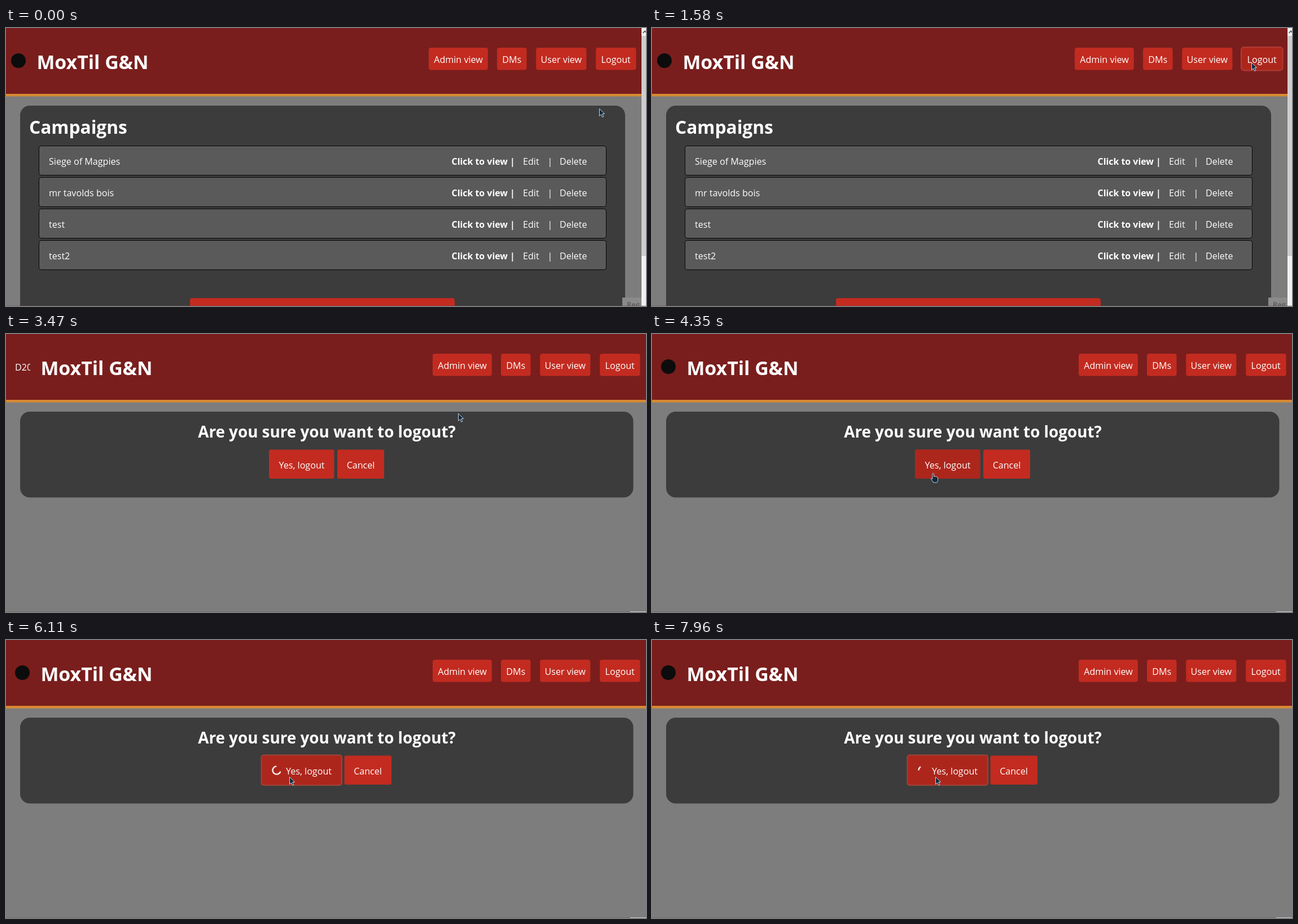
An HTML page for the animation above (8000 ms loop, 1134 by 494 pixels).

```html
<!DOCTYPE html>
<html lang="en">
<head>
<meta charset="utf-8">
<title>Logout flow</title>
<style>
html, body { margin: 0; width: 100%; height: 100%; overflow: hidden; background: #7d7d7d; }
svg { display: block; }
#stage { width: 1134px; height: 494px; font: 16.1px "Open Sans", "Noto Sans", sans-serif; fill: #fff; }
.mid { text-anchor: middle; }
.bold { font-weight: 700; }
.red { fill: #c32b20; }
.dark { fill: #ad261c; }
.card { fill: #3c3c3c; }
.row { fill: #5a5a5a; stroke: #050505; }

/* hard switches */
.list, .confirm, .alt, .logo2, .over, .ring, .idle, .hover2, .busy, .arrow, .hand {
  animation: 8s step-end infinite;
}
.list { animation-name: list; }
.confirm { animation-name: confirm; }
.alt { animation-name: alt; }
.logo2 { animation-name: logo2; }
.over { animation-name: over; }
.ring { animation-name: ring; }
.idle { animation-name: idle; }
.hover2 { animation-name: hover2; }
.busy { animation-name: busy; }
.arrow { animation-name: arrow; }
.hand { animation-name: hand; }
@keyframes list { 0% { opacity: 1 } 43.375%, 100% { opacity: 0 } }
@keyframes confirm { 0% { opacity: 0 } 43.375%, 100% { opacity: 1 } }
@keyframes alt { 0% { opacity: 1 } 45.875%, 100% { opacity: 0 } }
@keyframes logo2 { 0% { opacity: 0 } 45.875%, 100% { opacity: 1 } }
@keyframes over { 0% { opacity: 0 } 3.625%, 100% { opacity: 1 } }
@keyframes ring { 0% { opacity: 0 } 6.125%, 100% { opacity: 1 } }
@keyframes idle { 0% { opacity: 1 } 57%, 100% { opacity: 0 } }
@keyframes hover2 { 0% { opacity: 0 } 51%, 100% { opacity: 1 } }
@keyframes busy { 0% { opacity: 0 } 57%, 100% { opacity: 1 } }
@keyframes arrow {
  0% { opacity: 1 } 3.625% { opacity: 0 } 6.5% { opacity: 1 }
  51% { opacity: 0 } 57%, 100% { opacity: 1 }
}
@keyframes hand {
  0% { opacity: 0 } 3.625% { opacity: 1 } 6.5% { opacity: 0 }
  51% { opacity: 1 } 57%, 100% { opacity: 0 }
}

/* pointer path */
.pointer { animation: travel 8s ease-in-out infinite; }
@keyframes travel {
  0%, .4% { transform: translate(1051px, 143px) }
  4.4% { transform: translate(1061px, 66px) }
  7.75%, 18.9% { transform: translate(1063px, 59px) }
  19.7% { transform: translate(1062px, 61px) }
  29% { transform: translate(1016px, 91px) }
  32.4%, 47.6% { transform: translate(801px, 141px) }
  52.4% { transform: translate(503px, 253px) }
  54.3%, 55.5% { transform: translate(498px, 247px) }
  57.9%, 100% { transform: translate(502px, 243px) }
}

/* spinner: steady turn plus a 1.5 s grow and shrink */
.turn { transform-origin: 12px 12px; animation: turn 2s linear infinite; }
.arc { fill: none; stroke: #fff; stroke-width: 3; stroke-linecap: round; animation: arc 8s ease-in-out infinite; }
@keyframes turn { from { transform: rotate(240deg) } to { transform: rotate(600deg) } }
@keyframes arc {
  0%, 55.65% { stroke-dasharray: 42 150; stroke-dashoffset: -16 }
  64.56%, 65.5% { stroke-dasharray: 42 150; stroke-dashoffset: -59 }
  65.51% { stroke-dasharray: 0 150; stroke-dashoffset: 0 }
  74.4% { stroke-dasharray: 42 150; stroke-dashoffset: -16 }
  83.31%, 84.25% { stroke-dasharray: 42 150; stroke-dashoffset: -59 }
  84.26% { stroke-dasharray: 0 150; stroke-dashoffset: 0 }
  93.15% { stroke-dasharray: 42 150; stroke-dashoffset: -16; animation-timing-function: cubic-bezier(.434, 0, .653, .709) }
  100% { stroke-dasharray: 42 150; stroke-dashoffset: -54.3 }
}
</style>
</head>
<body>
<svg id="stage" viewBox="0 0 1134 494">
  <defs>
    <g id="head">
      <text class="bold" x="54.5" y="73" font-size="33.8">MoxTil G&amp;N</text>
      <g class="red">
        <rect x="749" y="35" width="104.8" height="39.5" rx="4"/>
        <rect x="870" y="35" width="52.5" height="39.5" rx="4"/>
        <rect x="939.2" y="35" width="89.2" height="39.5" rx="4"/>
        <rect x="1045.2" y="35" width="71.3" height="39.5" rx="4"/>
      </g>
      <g class="mid">
        <text x="801.5" y="62">Admin view</text>
        <text x="896.3" y="62">DMs</text>
        <text x="983.8" y="62">User view</text>
        <text x="1080.7" y="62">Logout</text>
      </g>
    </g>
    <g id="bar">
      <rect width="1134" height="117.5" fill="#791e1d"/>
      <rect y="117" width="1134" height="4.5" fill="#d88a32"/>
    </g>
    <g id="row">
      <rect class="row" x="58.5" y="209.5" width="1005" height="52" rx="4"/>
      <text class="bold" x="789.5" y="243" font-size="15.9">Click to view |</text>
      <text x="916" y="243">Edit</text>
      <text x="959.5" y="243">|</text>
      <text x="981" y="243">Delete</text>
    </g>
    <clipPath id="crop"><rect x="16" y="44" width="27" height="28"/></clipPath>
  </defs>

  <rect width="1134" height="494" fill="#7d7d7d"/>
  <use href="#bar"/>

  <g class="list">
    <circle cx="22" cy="58" r="13" fill="#0c0c0c"/>
    <use href="#head"/>
    <g class="over">
      <rect class="dark" x="1045" y="35" width="71.5" height="39.5" rx="4"/>
      <rect class="ring" x="1044" y="34" width="73.5" height="41.5" rx="5" fill="none" stroke="#b23c35" stroke-width="2"/>
      <text class="mid" x="1080.7" y="62">Logout</text>
    </g>
    <rect class="card" x="25" y="138" width="1072" height="400" rx="17"/>
    <text class="bold" x="41" y="188" font-size="31.7">Campaigns</text>
    <use href="#row"/>
    <use href="#row" y="56"/>
    <use href="#row" y="112"/>
    <use href="#row" y="168"/>
    <text x="76" y="243">Siege of Magpies</text>
    <text x="76" y="299">mr tavolds bois</text>
    <text x="76" y="355">test</text>
    <text x="76" y="411">test2</text>
    <rect class="red" x="326" y="480" width="469" height="30" rx="4"/>
    <rect x="1092" y="479" width="34" height="15" fill="#8a8a8a"/>
    <text class="bold" x="1100" y="496" font-size="12.5" style="fill:#606060">Reg</text>
    <rect x="1126" width="8" height="494" fill="#f0f0f0"/>
    <rect x="1126" y="14" width="8" height="391" fill="#cdcdcd"/>
    <path d="M1128.5 9l3.5-3.5 3.5 3.5" fill="none" stroke="#505050" stroke-width="1.6"/>
  </g>

  <g class="confirm">
    <use href="#head" x="7"/>
    <text class="alt" x="16" y="65" clip-path="url(#crop)">D20</text>
    <circle class="logo2" cx="29" cy="58" r="13" fill="#0c0c0c"/>
    <rect class="card" x="25" y="138" width="1086.5" height="152.5" rx="17"/>
    <text class="bold mid" x="568.5" y="184" font-size="27.8">Are you sure you want to logout?</text>
    <g class="idle mid">
      <rect class="red" x="466" y="205.5" width="115.5" height="51.5" rx="3"/>
      <rect class="dark hover2" x="466" y="205.5" width="115.5" height="51.5" rx="3"/>
      <rect class="red" x="587" y="205.5" width="83" height="51.5" rx="3"/>
      <text x="524" y="239">Yes, logout</text>
      <text x="628.5" y="239">Cancel</text>
    </g>
    <g class="busy mid">
      <rect class="dark" x="452.5" y="204.5" width="142.5" height="53.5" rx="4" stroke="#9d4338" stroke-width="2"/>
      <rect class="red" x="599.5" y="205.5" width="83.5" height="51.5" rx="3"/>
      <text x="536.5" y="239">Yes, logout</text>
      <text x="641" y="239">Cancel</text>
      <svg x="470.5" y="222.5" width="18" height="18" viewBox="0 0 24 24">
        <g class="turn"><circle class="arc" cx="12" cy="12" r="9.5"/></g>
      </svg>
    </g>
  </g>

  <rect y="493" width="1134" height="1" fill="#6e3c3c" opacity=".35"/>
  <rect class="confirm" x="1106" y="493" width="28" height="1" fill="#d0d0d0"/>

  <g class="pointer" fill="#10283c" stroke="#c4d6e4" stroke-linejoin="round">
    <path class="arrow" d="M.5.5v12.8l3-2.8 2.2 4.8 2.2-1-2.2-4.6 3.9-.3z"/>
    <path class="hand" d="M-1 1.2q1.5-1.6 2.6 0v5l1.4-.3 1.2.6 1.4-.2 1 .8q1.9-.3 1.9 1.6v3.6q0 2.4-1.6 4.6h-6.6q-1-2.8-3.4-5.2-1.4-1.8.2-2.4l1.9 1.4z"/>
  </g>
</svg>
</body>
</html>
```
